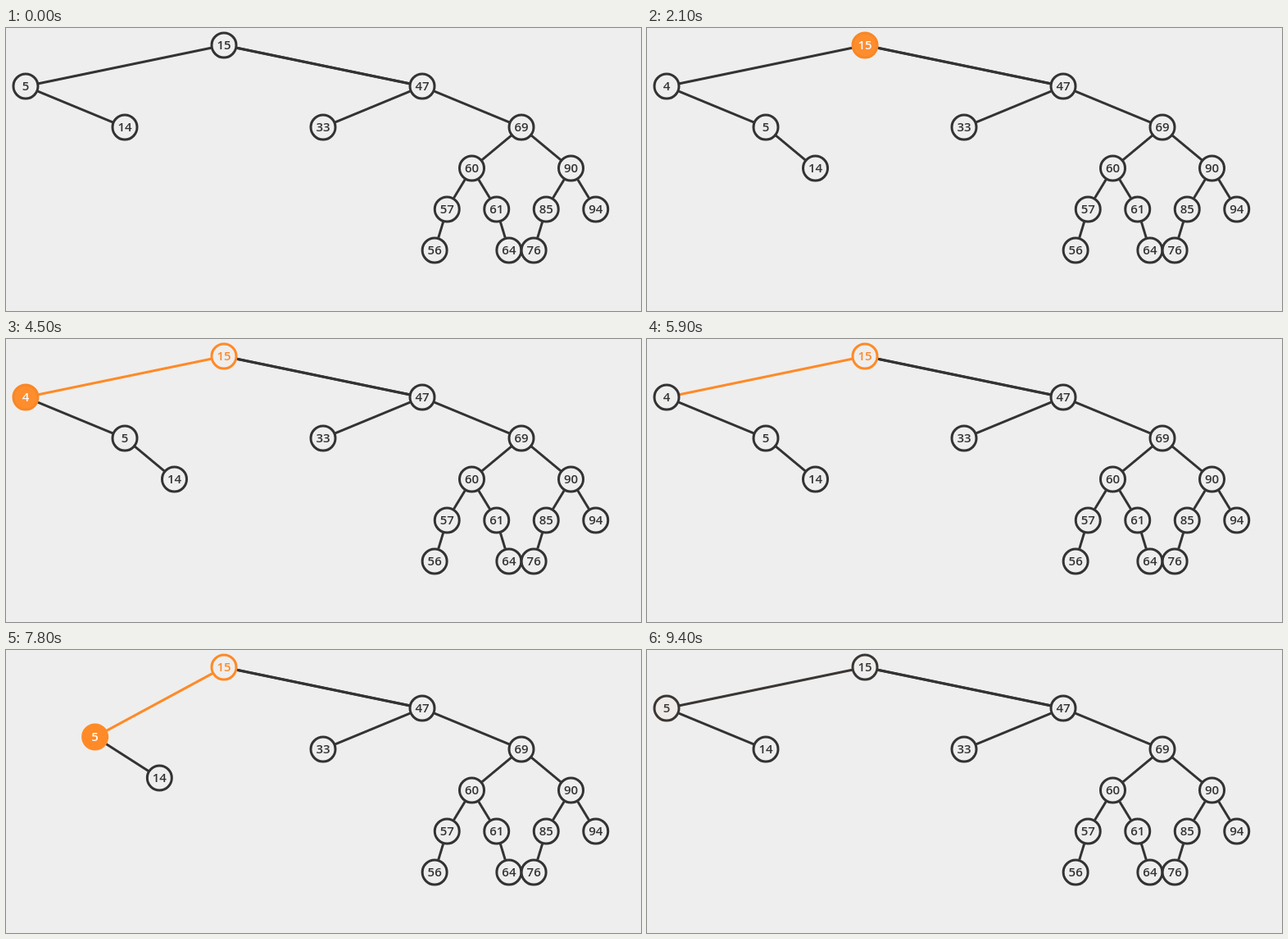
Write an HTML page with a canvas that moves like this. It is 775 by 345 pixels and loops after 9700 ms.

```html
<!DOCTYPE html>
<html lang="en">
<head>
<meta charset="utf-8">
<title>Binary search tree: removing a node</title>
<style>
  html, body { margin: 0; width: 100%; height: 100%; overflow: hidden; background: #eee; }
  canvas { display: block; width: 775px; height: 345px; }
</style>
</head>
<body>
<canvas id="stage" width="775" height="345"></canvas>
<script>
const ctx = document.getElementById('stage').getContext('2d');
const LOOP = 9700, STEP = 100, LAST = 9400;
const RADIUS = 15, LINE = 3, BORDER = 16;

const PAPER = [238, 238, 238], INK = [51, 51, 51], HOT = [255, 138, 39], WHITE = [255, 255, 255];
const PLAIN = { fill: PAPER, ring: INK, text: INK };
const ACTIVE = { fill: HOT, ring: HOT, text: WHITE };
const VISITED = { fill: PAPER, ring: HOT, text: HOT };

// A slot is a path of L/R turns from the root; each level halves the offset.
function slot(path) {
  let x = 266, dx = 242;
  for (const turn of path) {
    x += turn === 'L' ? -dx : dx;
    dx /= 2;
  }
  return { x, y: 21 + 50 * path.length };
}

const ROOT = slot(''), LEFT = slot('L'), INNER = slot('LR'), DEEP = slot('LRR');

const RIGHT_TREE = {
  R: 47, RL: 33, RR: 69, RRL: 60, RRR: 90,
  RRLL: 57, RRLR: 61, RRRL: 85, RRRR: 94,
  RRLLL: 56, RRLRR: 64, RRRLL: 76
};

const lerp = (a, b, k) => a + (b - a) * k;
const mix = (a, b, k) => a.map((v, i) => lerp(v, b[i], k));
const between = (a, b, k) => ({ x: lerp(a.x, b.x, k), y: lerp(a.y, b.y, k) });
const css = c => `rgb(${c.map(Math.round).join(',')})`;

function mixStyle(a, b, k) {
  return { fill: mix(a.fill, b.fill, k), ring: mix(a.ring, b.ring, k), text: mix(a.text, b.text, k) };
}

// Cubic in-out progress of a transition
function ease(t, start, length) {
  const p = Math.min(1, Math.max(0, (t - start) / length));
  return p < 0.5 ? 4 * p ** 3 : 1 - 4 * (1 - p) ** 3;
}

// End points of an edge on the borders of its two nodes
function span(a, b) {
  const d = Math.hypot(b.x - a.x, b.y - a.y);
  return [between(a, b, BORDER / d), between(b, a, BORDER / d)];
}

function line([a, b], color) {
  ctx.strokeStyle = css(color);
  ctx.lineWidth = LINE;
  ctx.beginPath();
  ctx.moveTo(a.x, a.y);
  ctx.lineTo(b.x, b.y);
  ctx.stroke();
}

const edge = (a, b, color = INK) => line(span(a, b), color);

function node(pos, value, style = PLAIN, size = 1) {
  if (size <= 0) return;
  ctx.save();
  ctx.translate(pos.x, pos.y);
  ctx.scale(size, size);
  ctx.beginPath();
  ctx.arc(0, 0, RADIUS, 0, Math.PI * 2);
  ctx.fillStyle = css(style.fill);
  ctx.fill();
  ctx.strokeStyle = css(style.ring);
  ctx.lineWidth = LINE;
  ctx.stroke();
  ctx.fillStyle = css(style.text);
  ctx.fillText(value, 0, 5);
  ctx.restore();
}

function rightTree() {
  const paths = Object.keys(RIGHT_TREE);
  for (const p of paths) edge(slot(p.slice(0, -1)), slot(p));
  for (const p of paths) node(slot(p), RIGHT_TREE[p]);
}

function shortTree() {
  edge(ROOT, LEFT);
  edge(LEFT, INNER);
  node(ROOT, 15);
  node(LEFT, 5);
  node(INNER, 14);
}

// Search for 4, before anything is removed
function searchTree(t) {
  const visit = ease(t, 1300, 1000), walk = ease(t, 2400, 1100);
  const found = ease(t, 3700, 1000) - ease(t, 5000, 1000);
  const [from, to] = span(ROOT, LEFT);
  if (walk < 1) line([from, to], INK);
  if (walk > 0) line([from, between(from, to, walk)], HOT);
  edge(LEFT, INNER);
  edge(INNER, DEEP);
  node(ROOT, 15, walk > 0 ? mixStyle(ACTIVE, VISITED, walk) : mixStyle(PLAIN, ACTIVE, visit));
  node(LEFT, 4, mixStyle(PLAIN, ACTIVE, found));
  node(INNER, 5);
  node(DEEP, 14);
}

// 4 shrinks away while its child's edge swings over to the root
function relink(t) {
  const k = ease(t, 6000, 1275);
  const [from, to] = span(ROOT, LEFT);
  const before = span(LEFT, INNER), after = span(ROOT, INNER);
  if (k < 1) line([from, between(to, from, k)], HOT);
  line(before.map((p, i) => between(p, after[i], k)), mix(INK, HOT, k));
  edge(INNER, DEEP);
  node(ROOT, 15, VISITED);
  node(LEFT, 4, PLAIN, 1 - k);
  node(INNER, 5, mixStyle(PLAIN, ACTIVE, k));
  node(DEEP, 14);
}

// The remaining branch slides up, then the colours fade
function settle(t) {
  const k = ease(t, 7300, 1185), fade = ease(t, 8600, 1000);
  const five = between(INNER, LEFT, k), fourteen = between(DEEP, INNER, k);
  edge(ROOT, five, mix(HOT, INK, fade));
  edge(five, fourteen);
  node(ROOT, 15, mixStyle(VISITED, PLAIN, fade));
  node(five, 5, mixStyle(ACTIVE, PLAIN, fade));
  node(fourteen, 14);
}

function draw(t) {
  ctx.fillStyle = css(PAPER);
  ctx.fillRect(0, 0, 775, 345);
  ctx.font = '600 15px "Open Sans", "Noto Sans", sans-serif';
  ctx.textAlign = 'center';
  edge(ROOT, slot('R'));
  rightTree();
  if (t < 700) shortTree();
  else if (t < 6000) searchTree(t);
  else if (t < 7300) relink(t);
  else settle(t);
}

const origin = performance.now();
function tick() {
  const t = (performance.now() - origin) % LOOP;
  draw(Math.min(LAST, Math.floor(t / STEP) * STEP));
  requestAnimationFrame(tick);
}
tick();
</script>
</body>
</html>
```
